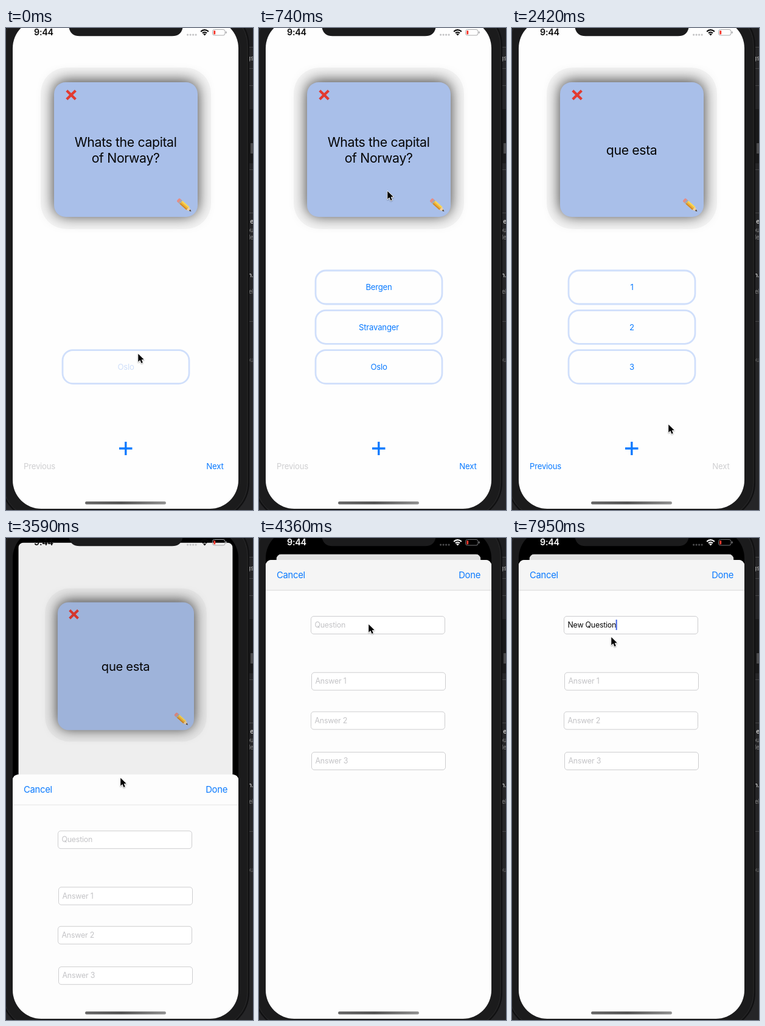
These frames come from a looping animation (406 by 791 pixels, 8 s). An HTML page with a canvas:

```html
<!DOCTYPE html>
<html lang="en">
<head>
<meta charset="utf-8">
<title>Flashcards</title>
<style>
html, body { margin: 0; width: 100%; height: 100%; overflow: hidden; background: #1b1b1c; }
canvas { display: block; width: 406px; height: 791px; }
</style>
</head>
<body>
<canvas id="stage"></canvas>
<script>
const W = 406, H = 791, LOOP = 8000;
const BLUE = '#0a7aff', PALE = '#d0dffb', OFF = '#cfcfd1';
const canvas = document.getElementById('stage');
const c = canvas.getContext('2d');
const dpr = window.devicePixelRatio || 1;
canvas.width = W * dpr;
canvas.height = H * dpr;

const BACK_IN = 200, BACK_OUT = 660, NEXT_AT = 1760, SHEET_AT = 3490, CARET_AT = 5680;
const QUESTION = 'New Question';
const KEYS = [5860, 5920, 5980, 5980, 6160, 6580, 6820, 6880, 7060, 7180, 7300, 7530];

// Pointer tip: time, x, y
const PATH = [
  [150, 217, 534], [640, 211, 267], [920, 211, 267], [1100, 216, 722], [1340, 216, 722],
  [1640, 340, 722], [1860, 340, 722], [2120, 327, 724], [2420, 257, 650], [2600, 197, 690],
  [2720, 197, 690], [2960, 187, 421], [3480, 187, 414], [3590, 188, 393], [3800, 195, 327],
  [4360, 180, 141], [4640, 180, 141], [4720, 187, 150], [7860, 187, 150], [7950, 163, 162]
];

const mix = (a, b, k) => a + (b - a) * k;
const grey = v => `rgb(${v},${v},${v})`;

function pointer(t) {
  const i = PATH.findIndex(k => k[0] > t);
  if (i === 0) return PATH[0].slice(1);
  if (i < 0) return PATH[PATH.length - 1].slice(1);
  const [t0, x0, y0] = PATH[i - 1], [t1, x1, y1] = PATH[i];
  let k = (t - t0) / (t1 - t0);
  k = k * k * (3 - 2 * k);
  return [mix(x0, x1, k), mix(y0, y1, k)];
}

// Critically damped spring
function sheetProgress(t) {
  if (t < SHEET_AT) return 0;
  const s = (t - SHEET_AT) * 0.0177;
  return 1 - (1 + s) * Math.exp(-s);
}

function box(x, y, w, h, r, fill, stroke, line = 1) {
  c.beginPath();
  c.roundRect(x, y, w, h, r);
  if (fill) { c.fillStyle = fill; c.fill(); }
  if (stroke) { c.strokeStyle = stroke; c.lineWidth = line; c.stroke(); }
}

function rect(x, y, w, h, fill) {
  c.fillStyle = fill;
  c.fillRect(x, y, w, h);
}

function line(color, width, ...p) {
  c.beginPath();
  c.moveTo(p[0], p[1]);
  for (let i = 2; i < p.length; i += 2) c.lineTo(p[i], p[i + 1]);
  c.strokeStyle = color;
  c.lineWidth = width;
  c.stroke();
}

function shape(fill, ...p) {
  c.beginPath();
  for (let i = 0; i < p.length; i += 2) c.lineTo(p[i], p[i + 1]);
  c.closePath();
  c.fillStyle = fill;
  c.fill();
}

function setFont(size, weight = 400) {
  c.font = `${weight} ${size}px Inter, Roboto, sans-serif`;
  c.letterSpacing = -0.018 * size + 'px';
}

function text(s, x, y, size, fill, align = 'left', weight) {
  setFont(size, weight);
  c.textAlign = align;
  c.fillStyle = fill;
  c.fillText(s, x, y);
}

function desk() {
  rect(0, 0, W, H, '#252527');
  rect(390, 0, 16, 31, '#1e1e20');
  rect(397, 133, 9, 89, '#19191a');
  rect(402, 189, 4, 17, '#4a4a4c');
  for (const y of [31, 66, 94, 232, 303, 481]) rect(390, y, 16, 1, '#464648');
  const scraps = [['gs', 53, '#b5b5b5'], ['e', 321, '#d0d0d0', 600], ['ou', 335, '#858585'],
    ['ele', 347, '#858585'], ['n.', 409, '#c0c0c0', 600], ['el', 436, '#858585'], ['ou', 548, '#606062']];
  for (const [s, y, fill, weight] of scraps) text(s, 407, y, 10, fill, 'right', weight);
  box(-7, -31, 406, 837, 60, '#1b1b1c', '#101011', 2);
  box(-5, -29, 402, 833, 58, null, '#2b2b2c', 0.8);
}

function pencil() {
  c.save();
  c.translate(282.5, 281.5);
  c.rotate(0.73);
  box(0, -3.5, 6, 7, 2, '#e58d86');
  rect(4, -3.5, 3, 7, '#a9a9ad');
  rect(7, -3.5, 15, 2.4, '#ffd84d');
  rect(7, -1.1, 15, 2.3, '#f5b52e');
  rect(7, 1.2, 15, 2.3, '#d98c1f');
  shape('#efcf9f', 22, -3.5, 29, 0, 22, 3.5);
  shape('#40342c', 26, -1.5, 29.5, 0, 26, 1.5);
  c.restore();
}

function card(t, scale) {
  const back = t >= BACK_IN && t < BACK_OUT;
  const fill = back ? '#c6d6f5' : '#a9bfe9';
  box(57, 65, 280, 265, 42, 'rgba(0,0,0,.035)');
  c.save();
  c.shadowColor = 'rgba(0,0,0,.78)';
  c.shadowBlur = 24 * scale * dpr;
  c.shadowOffsetY = -2 * scale * dpr;
  box(79, 89, 236, 221, 19, fill);
  c.restore();
  line('#e23a30', 4.2, 99.8, 102.8, 114.4, 117);
  line('#e23a30', 4.2, 114.4, 102.8, 99.8, 117);
  pencil();
  const label = (s, y) => text(s, 196.6, y, 21.3, '#050505', 'center');
  if (back) label('Oslo', 208);
  else if (t >= NEXT_AT) label('que esta', 208);
  else {
    label('Whats the capital', 195);
    label('of Norway?', 221);
  }
}

function home(t, scale) {
  rect(11, -14, 371, 803, '#fefefe');
  card(t, scale);
  const second = t >= NEXT_AT;
  const answers = second ? ['1', '2', '3'] : ['Bergen', 'Stravanger', 'Oslo'];
  answers.forEach((s, i) => {
    if (t < BACK_OUT && i < 2) return;
    const y = 398 + i * 65.3;
    box(93, y, 208, 55, 17, null, PALE, 2.8);
    text(s, 197, y + 32.3, 13.2, t < BACK_IN ? '#cfdffa' : BLUE, 'center');
  });
  line(BLUE, 3.4, 186, 690, 207.5, 690);
  line(BLUE, 3.4, 196.8, 679, 196.8, 701);
  text('Previous', 29, 724, 13.2, second ? BLUE : OFF);
  text('Next', 357.5, 724, 13.2, second ? OFF : BLUE, 'right');
}

function field(x, y, hint, value, caret) {
  box(x + 0.5, y + 0.5, 220, 29, 4.5, '#fff', '#cdcdcf');
  text(value || hint, x + 6.5, y + 19, 12.4, value ? '#080808' : '#c3c3c6');
  if (caret) rect(x + 6 + c.measureText(value).width, y + 6, 2, 17, '#3f62e4');
}

function sheet(t, p) {
  const y = mix(H, 36, p);
  const typed = QUESTION.slice(0, KEYS.filter(k => k <= t).length);
  box(11, y, 371, 820, [9, 9, 0, 0], '#fdfdfd');
  box(11, y, 371, 50, [9, 9, 0, 0], grey(Math.round(mix(262, 245, p))));
  rect(11, y + 49.3, 371, 1, grey(Math.round(mix(246, 214, p))));
  text('Cancel', 29, y + 30, 14.8, BLUE);
  text('Done', 364, y + 30, 14.8, BLUE, 'right');
  field(85, y + 92, 'Question', typed, t >= CARET_AT);
  field(86, y + 184.3, 'Answer 1');
  field(85, y + 248.6, 'Answer 2');
  field(86, y + 315, 'Answer 3');
}

function status(p) {
  const light = p > 0.9;
  const ink = light ? '#fff' : '#080808';
  text('9:44', 46, 12, 14.3, ink, 'left', 600);
  for (let i = 0; i < 4; i++) box(297 + i * 4.5, 9.5, 3.2, 3.2, 1.6, light ? '#4a4a4c' : '#c4c4c6');
  for (const r of [4.8, 8.6]) {
    c.beginPath();
    c.arc(326.5, 11.8, r, -Math.PI * 0.76, -Math.PI * 0.24);
    c.strokeStyle = ink;
    c.lineWidth = 2.2;
    c.stroke();
  }
  c.beginPath();
  c.moveTo(326.5, 12.4);
  c.arc(326.5, 12.4, 3.2, -Math.PI * 0.76, -Math.PI * 0.24);
  c.fillStyle = ink;
  c.fill();
  const rim = light ? '#77777a' : '#a9a9ab';
  box(339.5, 2.5, 20.5, 9.5, 3, null, rim);
  box(361, 5.5, 1.6, 3.6, 1, rim);
  box(341.2, 4.2, 3, 6.2, 1, '#f5392f');
}

function notch() {
  c.beginPath();
  c.moveTo(103, -14);
  c.lineTo(103, -5);
  c.quadraticCurveTo(104, 13.3, 121, 13.3);
  c.lineTo(273, 13.3);
  c.quadraticCurveTo(290, 13.3, 291, -5);
  c.lineTo(291, -14);
  c.fillStyle = '#1b1b1c';
  c.fill();
}

function homeBar() {
  const g = c.createLinearGradient(130, 0, 263, 0);
  g.addColorStop(0, '#686868');
  g.addColorStop(0.45, '#555');
  g.addColorStop(1, '#929292');
  box(130, 777, 133, 4.8, 2.4, g);
}

function arrow(x, y) {
  c.save();
  c.translate(x + 0.3, y + 0.8);
  c.scale(0.87, 0.87);
  c.beginPath();
  for (const [px, py] of [[0, 0], [0, 15], [3.5, 11.8], [6, 17.5], [8.6, 16.3], [6.2, 10.8], [10.8, 10.6]]) c.lineTo(px, py);
  c.closePath();
  c.lineJoin = 'round';
  c.strokeStyle = '#fff';
  c.lineWidth = 2;
  c.shadowColor = 'rgba(0,0,0,.35)';
  c.shadowBlur = 2 * dpr;
  c.shadowOffsetY = dpr;
  c.stroke();
  c.shadowColor = 'transparent';
  c.fillStyle = '#000';
  c.fill();
  c.restore();
}

function draw(t) {
  const p = sheetProgress(t);
  c.setTransform(dpr, 0, 0, dpr, 0, 0);
  desk();
  c.save();
  box(11, -14, 371, 803, 47, '#000');
  c.clip();
  if (p > 0) {
    const scale = 1 - 0.0945 * p;
    c.save();
    c.translate(11 + 17.5 * p, -14 + 40.5 * p);
    c.scale(scale, scale);
    c.translate(-11, 14);
    c.beginPath();
    c.roundRect(11, -14, 371, 803, 9);
    c.clip();
    home(t, scale);
    rect(11, -14, 371, 803, `rgba(0,0,0,${0.118 * p})`);
    c.restore();
    sheet(t, p);
  } else {
    home(t, 1);
  }
  status(p);
  homeBar();
  notch();
  c.restore();
  arrow(...pointer(t));
}

const start = performance.now();
function tick() {
  draw((performance.now() - start) % LOOP);
  requestAnimationFrame(tick);
}
tick();
</script>
</body>
</html>
```
